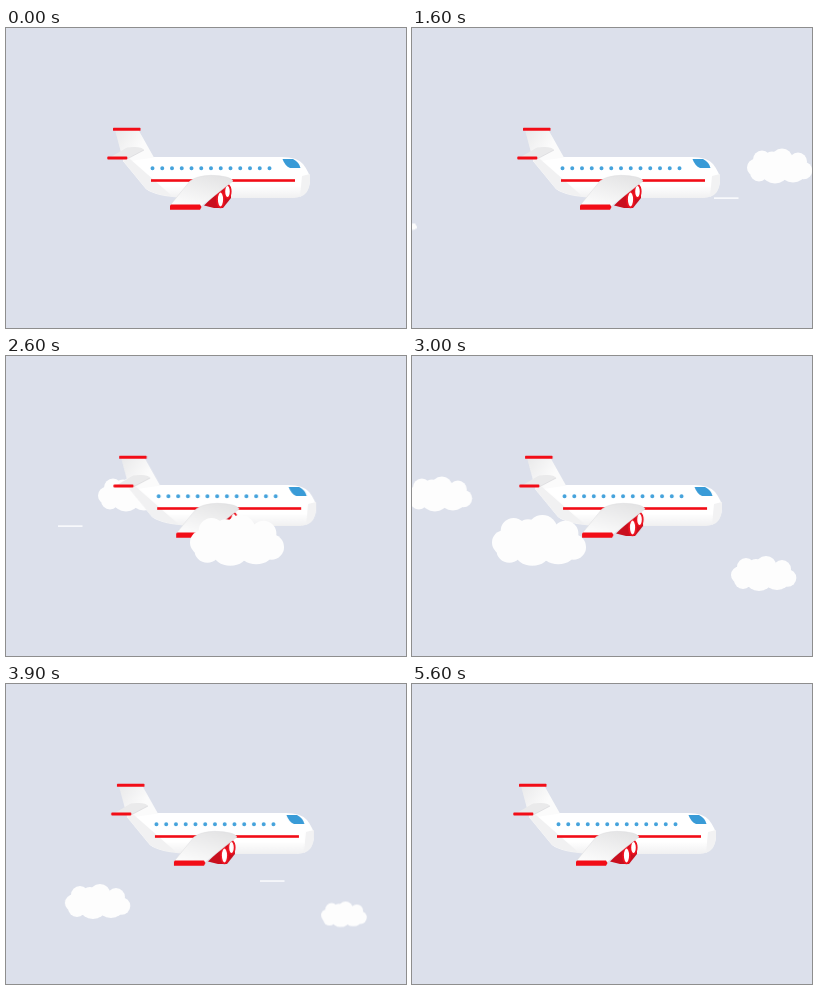
These frames come from a looping animation (400 px wide and 300 px high, 5.8 s). An HTML page without scripts:

```html
<!DOCTYPE html>
<html lang="en">
<head>
<meta charset="utf-8">
<title>Plane in the clouds</title>
<style>
  html, body { margin: 0; width: 100%; height: 100%; overflow: hidden; background: #dce0eb; }
  svg { display: block; width: 100%; height: 100%; }

  /* --x: place at the start of the loop, --v: travel per 100 ms tick */
  .drift { animation: drift 5.8s steps(58) infinite; }
  @keyframes drift {
    from { transform: translateX(var(--x)); }
    to { transform: translateX(calc(var(--x) - 58 * var(--v))); }
  }

  .plane { animation: sway 5.8s cubic-bezier(.37, 0, .63, 1) infinite; }
  @keyframes sway {
    0%, 96.55%, 100% { transform: translateX(0); }
    46.55% { transform: translateX(6.2px); }
  }

  .cloud-a { --x: 723.8px; --v: 24.3px; }
  .cloud-b { --x: 860px; --v: 26px; }
  .cloud-c { --x: 1186px; --v: 28.9px; }
  .cloud-d { --x: 1177px; --v: 22.1px; }
  .puff { --x: 419px; --v: 26.75px; }
  .wind-a { --x: 702px; --v: 25px; }
  .wind-b { --x: 587px; --v: 25px; }
  .wind-c { --x: 1482.5px; --v: 31.5px; }

  .wind rect { width: 24.5px; height: 1.7px; fill: #f8f9fc; }
  .red { fill: #f20d17; }
</style>
</head>
<body>
<svg viewBox="0 0 400 300">
  <defs>
    <g id="cloud" fill="#fdfdfd">
      <circle cx="8.5" cy="19" r="8.5"/>
      <circle cx="15" cy="11" r="9"/>
      <circle cx="35" cy="10.5" r="10.5"/>
      <circle cx="25" cy="11" r="8"/>
      <circle cx="51" cy="13" r="9"/>
      <circle cx="56.5" cy="22" r="8.8"/>
      <circle cx="12" cy="24" r="9"/>
      <ellipse cx="28" cy="26" rx="12" ry="9"/>
      <ellipse cx="46" cy="25" rx="12" ry="9"/>
      <rect x="9" y="12" width="46" height="16"/>
    </g>
    <linearGradient id="body" x1="0" y1="0" x2="0" y2="1">
      <stop offset=".75" stop-color="#fff"/>
      <stop offset="1" stop-color="#f0f0f1"/>
    </linearGradient>
    <linearGradient id="fin" x1="0" y1="0" x2="1" y2=".6">
      <stop offset="0" stop-color="#e9e9ea"/>
      <stop offset=".7" stop-color="#fbfbfb"/>
    </linearGradient>
    <linearGradient id="wing" x1=".2" y1="1" x2=".75" y2="0">
      <stop offset="0" stop-color="#fcfcfc"/>
      <stop offset="1" stop-color="#e4e4e5"/>
    </linearGradient>
  </defs>

  <g class="drift cloud-a"><use href="#cloud" y="120.5"/></g>
  <g class="wind">
    <g class="drift wind-a"><rect y="169.3"/></g>
    <g class="drift wind-b"><rect y="129.3"/></g>
    <g class="drift wind-c"><rect y="196.2"/></g>
  </g>

  <g class="plane">
    <path fill="url(#body)" d="M117 133L134 120L146 129H276Q291 129 297 136Q304 145 304 152Q303 169 288 170H180Q150 169 140 161Z"/>
    <path fill="url(#fin)" d="M109 102H132.500L148 129.500L117.500 134Z"/>
    <path fill="#f1f1f2" d="M117 133L124 131L166 168Q150 167 140 161Z"/>
    <path fill="#f2f2f3" d="M296 148L304 146V154Q303 166 294 169Z"/>
    <path fill="#eaeaeb" d="M103 130L121 119.500Q136 118 138 122L121 131Z"/>
    <path fill="none" stroke="#d9d9db" stroke-width=".7" d="M121 131L138 122"/>
    <rect class="red" x="107" y="99.800" width="27.500" height="3" rx=".6"/>
    <rect class="red" x="101.300" y="128.600" width="20" height="3" rx=".8"/>

    <path fill="none" stroke="#45a3dc" stroke-width="4" stroke-linecap="round" stroke-dasharray="0 9.75" d="M146.500 140.300H264"/>
    <rect class="red" x="145" y="151.200" width="144" height="2.600"/>
    <path fill="#399bd7" d="M276.500 131H287Q293 134 294.500 140H284Q279 138 276.500 131Z"/>

    <path fill="#c90f1e" d="M198 177.500L218 158L225 159V170L217 180H208Z"/>
    <g fill="#fff" stroke="#ed1220" stroke-width="1.800">
      <ellipse cx="221.500" cy="163.500" rx="3.200" ry="6.500"/>
      <ellipse cx="214.500" cy="171.500" rx="3.500" ry="7.800"/>
    </g>
    <path fill="url(#wing)" stroke="#dcdcde" stroke-width=".5" d="M164 177.500L184 153Q190 148 205 147.300Q225 148 227 153L195 178.500Z"/>
    <path class="red" d="M165 176.600H194L195.500 179L194 181.800H164V177.500Z"/>
  </g>

  <g class="drift cloud-b"><use href="#cloud" transform="translate(0 159) scale(1.44 1.45)"/></g>
  <g class="drift cloud-c"><use href="#cloud" y="200"/></g>
  <g class="drift cloud-d"><use href="#cloud" transform="translate(0 217.500) scale(.7 .73)"/></g>
  <g class="drift puff"><use href="#cloud" transform="translate(0 194.500) scale(.215)"/></g>
</svg>
</body>
</html>
```
